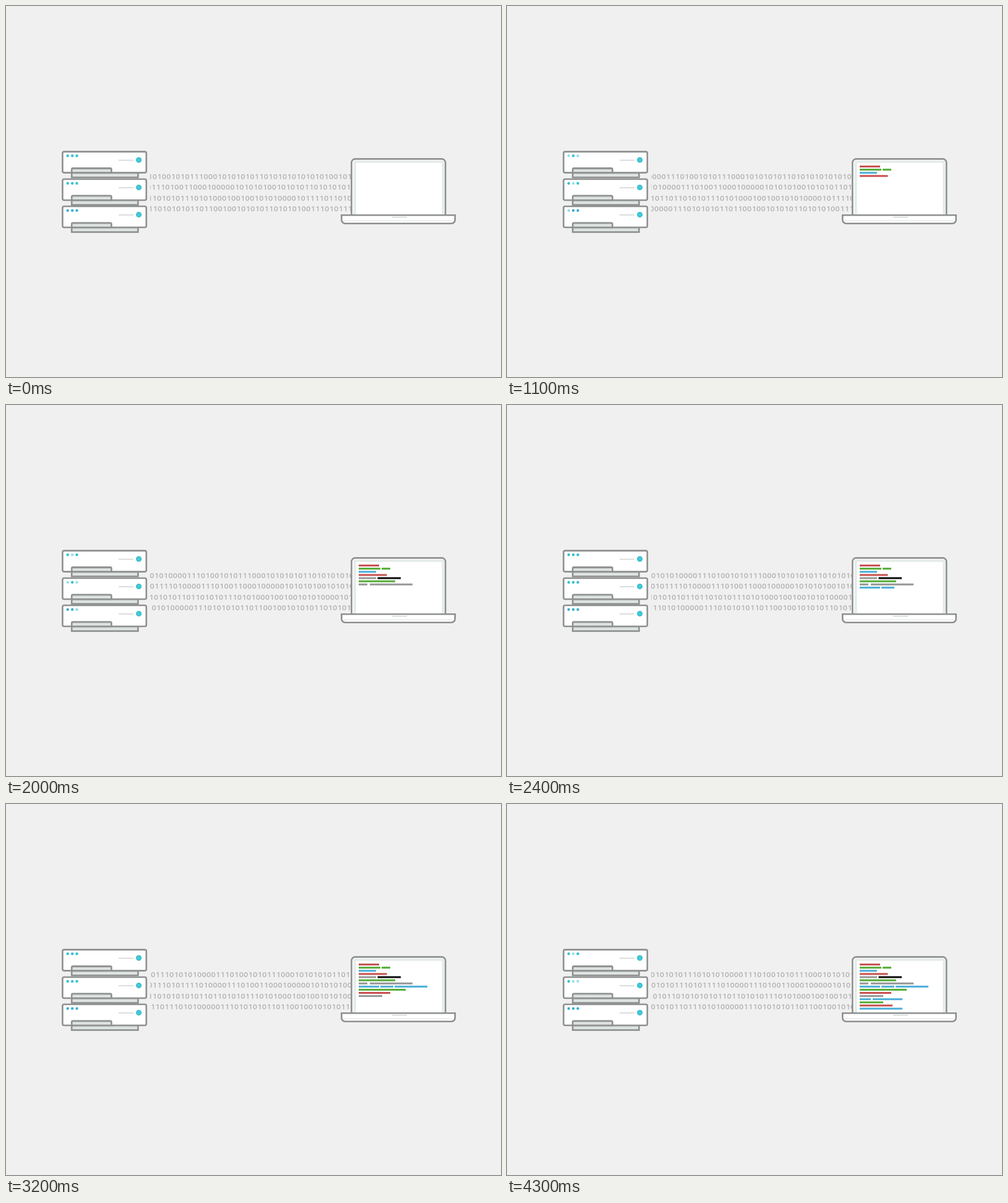
An HTML page for the animation above (4.4 s loop, 800 by 600 pixels).

```html
<!DOCTYPE html>
<html lang="en">
<head>
<meta charset="utf-8">
<title>Server to laptop</title>
<style>
  html, body { margin: 0; width: 100%; height: 100%; overflow: hidden; background: #f0f0f0; }
  svg { display: block; width: 800px; height: 600px; }
  .line { stroke: #8e908f; stroke-width: 2.6; }
  .digits { font: 600 11px Inter, "Open Sans", sans-serif; fill: #b2b2b2; text-anchor: middle; }
</style>
</head>
<body>
<svg viewBox="0 0 800 600" xmlns="http://www.w3.org/2000/svg">
  <defs>
    <linearGradient id="shade" x2="0" y2="1">
      <stop offset="0" stop-color="#b9bfbd"/>
      <stop offset=".55" stop-color="#e1e7e5"/>
      <stop offset="1" stop-color="#dde4e2"/>
    </linearGradient>
    <clipPath id="gap"><rect x="233" y="265" width="324" height="75"/></clipPath>
    <g id="server">
      <rect class="line" x="106.2" y="269" width="107.2" height="8.2" fill="url(#shade)"/>
      <rect class="line" x="91.4" y="235.6" width="135.4" height="34" rx="2.5" fill="#fff"/>
      <path class="line" d="M106.2 269.6V264.4a2 2 0 0 1 2-2H168.4a2 2 0 0 1 2 2V269.6Z" fill="url(#shade)"/>
      <path d="M182 249.5H206" stroke="#d6d8d7" stroke-width="1.7"/>
      <circle cx="214.6" cy="249" r="3.9" fill="#3fcbdb" stroke="#38b3c2" stroke-width="1.2"/>
    </g>
  </defs>
  <rect width="800" height="600" fill="#f0f0f0"/>

  <use href="#server"/>
  <use href="#server" y="44.4"/>
  <use href="#server" y="88.4"/>
  <g id="leds"></g>

  <g id="stream" class="digits" clip-path="url(#gap)"></g>

  <path class="line" d="M558.4 338V253.4a6 6 0 0 1 6-6H704.2a6 6 0 0 1 6 6V338Z" fill="#fff"/>
  <path d="M561.5 338V253a3 3 0 0 1 3-3H705.5a3 3 0 0 1 3 3V338Z" fill="#e6ecea"/>
  <rect x="565.8" y="253.8" width="138.6" height="84" fill="#fff"/>
  <g id="code"></g>
  <path class="line" d="M542.3 338.3H725.7V345.8a6 6 0 0 1-6 6H548.3a6 6 0 0 1-6-6Z" fill="#fff"/>
  <path d="M546 347.3H722" stroke="#e6ebe9" stroke-width="1.6"/>
  <path d="M624 341.7H648" stroke="#d6d9d8" stroke-width="1.6"/>
</svg>
<script>
const STEP = 100, STEPS = 44, PITCH = 7.5;
const byId = id => document.getElementById(id);

function add(parent, tag, attrs) {
  const node = document.createElementNS("http://www.w3.org/2000/svg", tag);
  for (const key in attrs) node.setAttribute(key, attrs[key]);
  return parent.appendChild(node);
}

// Each row: centre of the first digit, speed and slowdown per step, digits
const rows = [
  [67.8, 3.9, 0, "0101010111010101000011101001010111000" + "10101010110101010101010100101"],
  [81, 4.35, .017, "010101110101111010000111010011000100000" + "1010101001010101101010101"],
  [105.2, 3.8, .016, "0101101010101011011010101110101000" + "100100101010000101111011010"],
  [76.1, 4.3, .0135, "0101011011101010000011101010101101100" + "1001010101101010100111010111"]
].map(([start, speed, drag, digits], i) => {
  const node = add(byId("stream"), "text", {
    x: [...digits].map((_, k) => (start + k * PITCH).toFixed(2)).join(" "),
    y: 280 + i * 17.25
  });
  node.textContent = digits;
  return { node, speed, drag };
});

// Code lines: colour, then left and right edge of each segment
const RED = "#c8504f", GREEN = "#55ab36", BLUE = "#4badd9", GRAY = "#959796", BLACK = "#0a0a0a";
const lines = [
  [[RED, 570, 603]],
  [[GREEN, 570, 605], [GREEN, 607, 621]],
  [[BLUE, 570, 598]],
  [[RED, 570, 615.5]],
  [[GRAY, 570, 598], [BLACK, 600.5, 638]],
  [[GREEN, 570, 629]],
  [[GRAY, 570, 584], [GRAY, 588, 657]],
  [[BLUE, 570, 603], [BLUE, 605, 626], [BLUE, 628, 681]],
  [[GREEN, 570, 646]],
  [[RED, 570, 621]],
  [[GRAY, 570, 608]],
  [[BLUE, 570, 588], [BLUE, 591, 639]],
  [[GREEN, 570, 608]],
  [[RED, 570, 623]],
  [[BLUE, 570, 639]]
];
const segments = lines.flatMap((line, i) => line.map(([fill, left, right]) =>
  add(byId("code"), "rect", { x: left, y: 258.1 + i * 5.1, width: right - left, height: 3, fill })));

const leds = Array.from({ length: 9 }, (_, i) => {
  const server = Math.floor(i / 3);
  return add(byId("leds"), "circle", {
    cx: 99.7 + i % 3 * 7.4, cy: [242.2, 286.7, 330.7][server], r: 2.2,
    fill: server < 2 ? "#38c1d0" : "#3cb0d2"
  });
});

// Lit lamps from a given step on, three per server
const ON = "111111111";
const blinks = [
  [0, ON], [4, "010101011"], [13, ON], [20, "101010110"], [23, ON],
  [26, "000000011"], [30, ON], [33, "010101001"], [38, ON], [41, "101100111"]
];

function draw(now) {
  const step = Math.floor(now / STEP) % STEPS;
  for (const { node, speed, drag } of rows) {
    const shift = speed * step - drag * step * step;
    node.setAttribute("transform", `translate(${shift.toFixed(2)} 0)`);
  }
  segments.forEach((bar, i) => bar.setAttribute("visibility", step >= 2 * (i + 1) ? "visible" : "hidden"));
  const lit = blinks.filter(([from]) => from <= step).pop()[1];
  leds.forEach((led, i) => led.setAttribute("opacity", lit[i] === "1" ? 1 : .5));
}

const begin = performance.now();
function tick() {
  draw(performance.now() - begin);
  requestAnimationFrame(tick);
}
tick();
</script>
</body>
</html>
```
